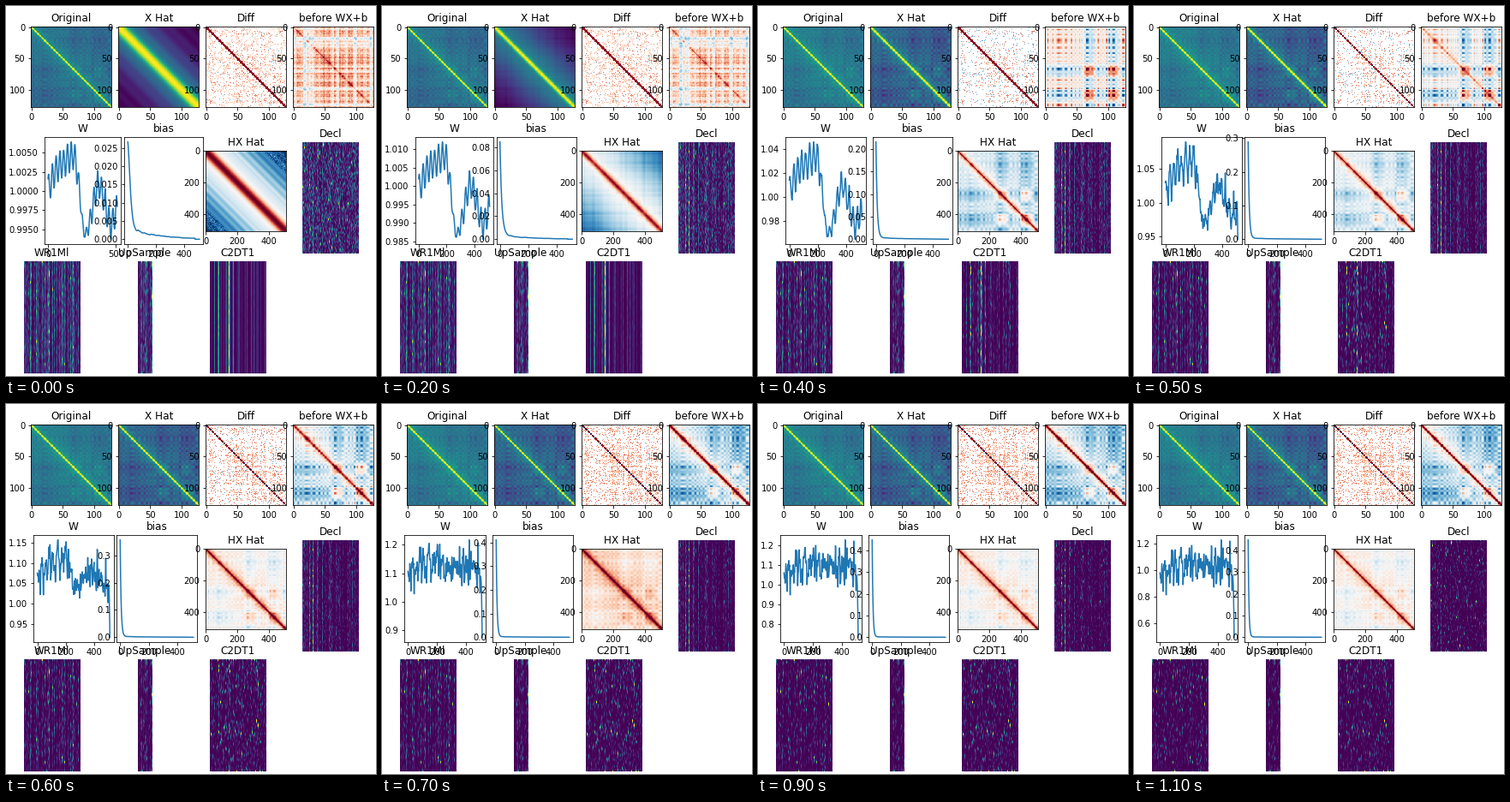
Recreate the animation shown at these times as a matplotlib script. Size 432 px wide and 432 px high, loop 1.2 s.

```python
import numpy as np
import matplotlib.pyplot as plt
from matplotlib.animation import FuncAnimation

SIZE, FRAMES, N = 432, 12, 128
rng = np.random.default_rng(7)


def blur(a, s, axis=0):
    r = int(3 * s) + 1
    w = np.exp(-0.5 * (np.arange(-r, r + 1) / s) ** 2)
    w /= w.sum()
    pad = [(r, r) if ax == axis else (0, 0) for ax in range(a.ndim)]
    p = np.pad(a, pad, mode="edge")
    return np.apply_along_axis(lambda v: np.convolve(v, w, "valid"), axis, p)


def unit(a):
    return (a - a.mean()) / a.std()


def symmetric(a):
    return unit(a + a.T)


def clamp(x):
    return np.clip(x, 0, 1)


def smooth(x):
    x = clamp(x)
    return x * x * (3 - 2 * x)


def peak(dist, s, power=1):
    return np.exp(-(dist / s) ** power)


# Tracks along the sequence: two compartments crossed by finer stripes
cell = np.arange(N)
in_b = (abs(cell - 69) < 9) | (abs(cell - 108) < 9)
fine = unit(blur(rng.normal(size=N), 1.1))
stripe = np.sin(.75 * cell + 2 * np.sin(.13 * cell)) + .4 * fine
comp = blur(np.where(in_b, .8, -.35), 1.5) + .22 * stripe


def grids(n):
    """Distance, compartment, lattice and stripe maps of n by n cells."""
    pos = np.linspace(0, N - 1, n)
    c, s, f = (np.interp(pos, cell, v) for v in (comp, stripe, fine))
    dist = np.abs(pos[:, None] - pos)
    return dist, np.outer(c, c), np.outer(s, s), (f[:, None] + f) / 1.4


D, P, L, G = grids(N)
HD, HP, HL, HG = grids(256)
rough = symmetric(rng.normal(size=(N, N)))
h_rough = symmetric(rng.normal(size=(256, 256)))
blobs = symmetric(blur(blur(rng.normal(size=(N, N)), 2.4), 2.4, 1))
dots = rng.random((N, N))
beads = rng.random(N)[:, None]

# Early stages depend on the distance from the diagonal alone
wide = .55 * peak(D, 13, 2) + .45 * peak(D, 55, 1.7) + .02 * np.sin(D / 4)
slim = .55 * peak(D, 5, 2) + .5 * peak(D, 75, 1.5) - .05 + .012 * G
h_wide = (.5 * peak(HD, 11, 2) + .53 * peak(HD, 85, 2) - .03
          + .04 * np.sin(HD * .45) * (HD > 40)
          + .06 * h_rough * (HD > 92))
h_slim = .42 * peak(HD, 6, 1.5) + .53 - .0033 * HD + .018 * HG


def streaks(rows, cols, length, tilt=0):
    noise = unit(blur(rng.normal(size=(rows, cols)), length))
    column = unit(rng.normal(size=cols) + tilt * np.linspace(-1, 1, cols))
    return noise, column


def streak_image(parts, weight, power, top=7):
    noise, column = parts
    s = noise + weight * column
    rank = s.ravel().argsort().argsort().reshape(s.shape) / s.size
    return (-np.log(1 - rank) / top) ** power


decl_parts = streaks(130, 66, 1.1)
wr_parts = streaks(131, 66, 1.6)
up_parts = streaks(131, 16, 1.6, 1.2)
c2_parts = streaks(131, 66, 1.6, -.4)

# Weight curve: a slow trend with a regular ripple, later drowned in noise
K = np.arange(512)
U = K / 511
trend = np.interp(U, [0, .1, .38, .44, .52, .6, .72, .8, .9, 1],
                  [.45, .65, .8, .55, 0, .15, .55, .4, .1, .3])
wave = np.cos(2 * np.pi * (U - .062) / .0545)
base = blur(trend, 8) + .13 * wave * (1 - .75 * peak(abs(U - .53), .07, 2))
jitter = unit(blur(rng.normal(size=512), 1.6))
ripple = unit(blur(rng.normal(size=512), 4))

fig = plt.figure(figsize=(SIZE / 72, SIZE / 72), dpi=72, facecolor="white")


def box(left, top, right, bottom):
    return [left / SIZE, 1 - bottom / SIZE,
            (right - left) / SIZE, (bottom - top) / SIZE]


def add_axes(title, *edges):
    ax = fig.add_axes(box(*edges))
    ax.set_title(title, fontsize=12)
    return ax


def add_map(title, left, top, w, h, cmap="viridis", n=None):
    ax = add_axes(title, left, top, left + w, top + h)
    extent = (-.5, n - .5, n - .5, -.5) if n else None
    im = ax.imshow(np.zeros((2, 2)), cmap=cmap, vmin=0, vmax=1,
                   extent=extent, aspect="auto", interpolation="nearest")
    if not n:
        ax.axis("off")
    return im


def add_curve(title):
    ax = add_axes(title, 32, 153, 125, 278)
    line, = ax.plot(K, K * 0.0)
    ax.ticklabel_format(axis="y", useOffset=False)
    return ax, line


SIDE, STEP = 93.9, 102
original, x_hat, diff, before = (
    add_map(title, 29.3 + STEP * j, 24.2, SIDE, SIDE, cmap, N)
    for j, (title, cmap) in enumerate([
        ("Original", "viridis"), ("X Hat", "viridis"),
        ("Diff", "RdBu_r"), ("before WX+b", "RdBu_r")]))
w_ax, w_line = add_curve("W")
b_ax, b_line = add_curve("bias")
hx_hat = add_map("HX Hat", 233.3, 169.2, SIDE, SIDE, "RdBu_r", 512)
decl = add_map("Decl", 346.3, 159, 65.4, 130.4)
wr = add_map("WR1Ml", 20.9, 298, 65.6, 131)
up = add_map("UpSample", 153.6, 298, 16.4, 131)
c2 = add_map("C2DT1", 238, 298, 65.6, 131)


def fit(ax, lo, hi):
    """Set the y range and return the number of decimals in its labels."""
    m = .05 * (hi - lo)
    ax.set_ylim(lo - m, hi + m)
    labels = ax.yaxis.get_major_formatter().format_ticks(ax.get_yticks())
    return len(labels[-1].split(".")[-1])


def draw_maps(i, t):
    # Three stages: wide band, slim band, full texture
    a, c = clamp(1 - i / 2), clamp(i / 2 - 1)
    b = 1 - a - c
    late = smooth((i - 4) / 3)
    width = 2.9 - 1.1 * late

    original.set_data(.33 + .04 * c + .1 * peak(D, 45) + .1 * peak(D, 7)
                      + .45 * peak(D, 2, 2) + .06 * P + .03 * L
                      + .015 * G + .015 * rough)
    full = (.28 + .1 * peak(D, 35) + .13 * peak(D, 6)
            + .5 * peak(D, width, 2) + .11 * P + .05 * L + .02 * G)
    x_hat.set_data(a * wide + b * slim + c * full)

    # Cells without a difference stay blank
    ring = (abs(blobs + .25 * L) < .3) & (rough > -.9)
    speck = rough + .5 * G + .4 * L + .6 * peak(D, 25) > 1.9 - .8 * late
    d = np.where(ring & (late + c < 1), .6 + .03 * rough, np.nan)
    d = np.where(speck, .66 + .05 * rough, d)
    d = np.where(dots < .006 + .03 * c * (1 - late), .25, d)
    d = np.where(D <= 2 - late, .95, d)
    diff.set_data(np.where((D == 0) & (beads < .6 * late), 0, d))

    cross = (cell[:, None] == 69) | (cell == 126)
    plaid = (.6 + .09 * G + .03 * L + .17 * peak(D, 3) + .03 * rough
             - .3 * cross - .04 * b)
    blocks = .5 + .45 * P + .08 * L
    thin = (.36 + .2 * peak(D, 25) + .2 * P + .06 * L - .1 * D / N
            + .4 * peak(D, 5.5 - 2.5 * t, 2))
    before.set_data((1 - c) * plaid + c * ((1 - late) * blocks + late * thin))

    glow = peak(abs(i - 7), 1, 2)
    full = (.37 + .12 * late + .08 * glow + .1 * peak(HD, 25)
            + .45 * peak(HD, 5 - 2.5 * t) + (.22 - .13 * late) * HP
            + .03 * HL + .02 * HG)
    hx_hat.set_data(a * h_wide + b * h_slim + c * full)

    power = .95 + 1.1 * smooth(t)
    decl.set_data(streak_image(decl_parts, .3 + .8 * np.sin(np.pi * t), power))
    wr.set_data(streak_image(wr_parts, 1.5 - 1.2 * t, power))
    up.set_data(streak_image(up_parts, 1.1 - .8 * t, power))
    c2.set_data(streak_image(c2_parts, 25 * (1 - t) ** 6, 1.6 + .4 * t,
                             5 + 2 * t))


def draw_curves(i, t):
    noisy = smooth((i - 3) / 5)
    v = ((1 - .95 * noisy) * base + (.008 + .1 * noisy) * jitter
         - .35 * noisy * peak(K, 10) - .65 * noisy * peak(511 - K, 7))
    lo = 1 - .0063 * np.exp(4.38 * t * (1 + .08 * np.sin(np.pi * t)))
    hi = 1 + .0064 * np.exp(3.57 * smooth(i / 7.5))
    w_line.set_ydata(lo + (hi - lo) * (v - v.min()) / np.ptp(v))
    n = fit(w_ax, lo, hi)
    w_ax.set_position(box(19.6 + 6.36 * n, 153, 117 + 4.25 * n, 278))

    top = .0267 + .422 * smooth(i / 8.6)
    tail = .003 + .117 * np.exp(-i / 2)
    drop = peak(K, 5 + 17 * np.exp(-i / 2.5), 1 + .5 * clamp(1 - i / 2))
    rest = peak(K, 190) * (1 + .06 * ripple * (K > 20)) * (K < 480)
    b_line.set_ydata(top * ((1 - tail) * drop + tail * rest))
    n = fit(b_ax, 0, top)
    b_ax.set_position(box(124.5 + 4.5 * n, 153, 219.5 + 3.5 * n, 278))


def draw(i):
    t = i / (FRAMES - 1)
    draw_maps(i, t)
    draw_curves(i, t)
    return []


anim = FuncAnimation(fig, draw, frames=FRAMES, interval=100, repeat=True,
                     repeat_delay=0, init_func=lambda: draw(0))
plt.show()
```
